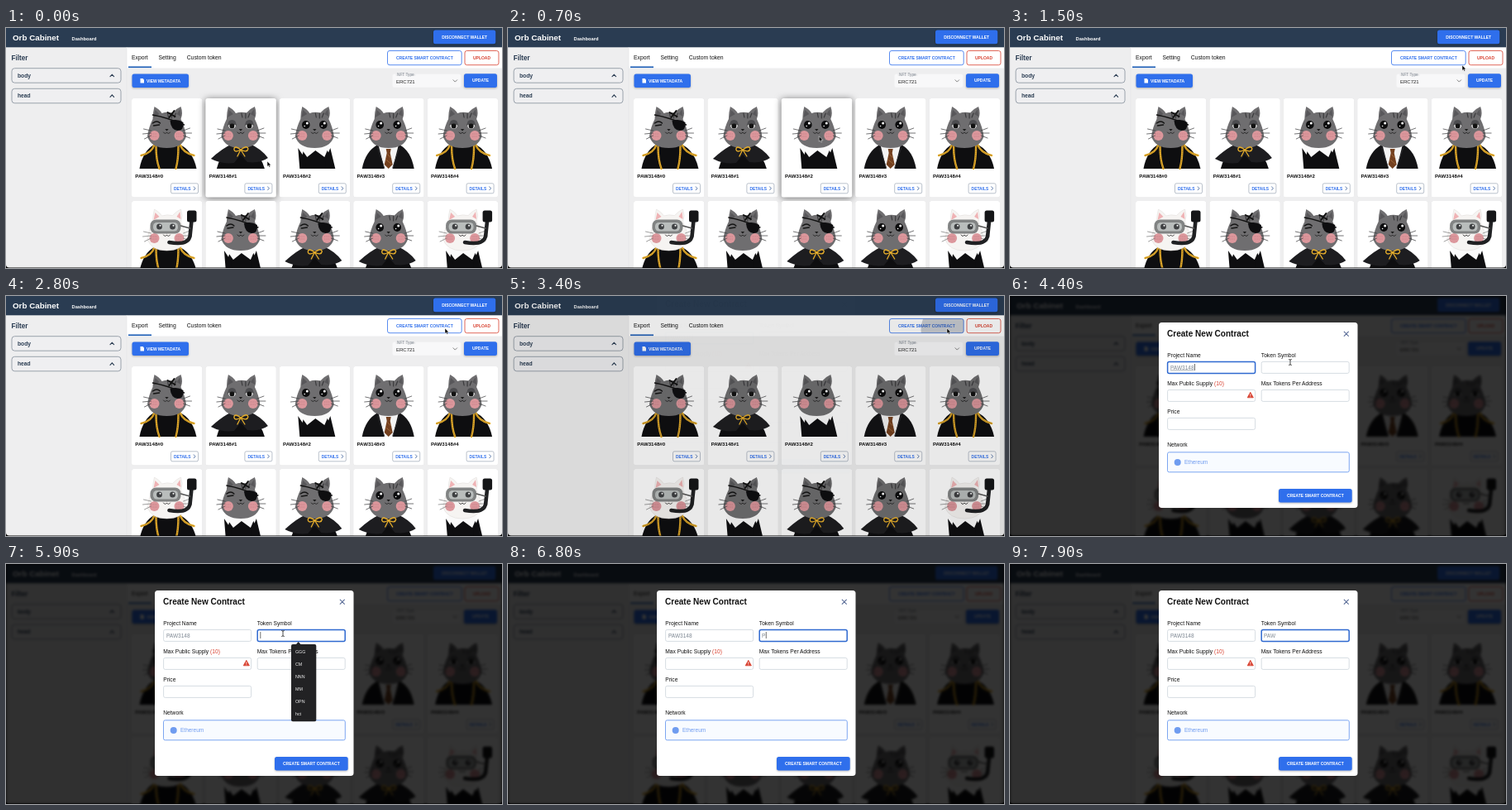
These frames come from a looping animation (600x290 px, 8000 ms). An HTML page:

```html
<!DOCTYPE html>
<html lang="en">
<head>
<meta charset="utf-8">
<title>Create contract</title>
<style>
  html, body { margin: 0; width: 100%; height: 100%; overflow: hidden; background: #000; }
  svg { display: block; width: 600px; height: 290px; font-family: "Liberation Sans", Arial, sans-serif; }
  .card { filter: drop-shadow(0 .5px .5px #0002); }
  .card.hover { filter: drop-shadow(0 1px 4px #0008); }
  .raised { filter: drop-shadow(0 1px 1px #0004); }
</style>
</head>
<body>
<svg id="stage" viewBox="0 0 600 290"></svg>
<script>
const LOOP = 8000;
const BLUE = '#2f6fec', RED = '#d8402f', NAVY = '#2a3c52', GOLD = '#e6ae2c', BLACK = '#0e0e10';
const COLLECTION = 'PAW3148', SYMBOL = 'PAW';

// Markup helpers
const text = (x, y, size, str, fill = '#111', extra = '') =>
  `<text x="${x}" y="${y}" font-size="${size}" fill="${fill}" ${extra}>${str}</text>`;
const bold = (x, y, size, str, fill, extra = '') =>
  text(x, y, size, str, fill, 'font-weight="700" ' + extra);
const rect = (x, y, w, h, fill, extra = '') =>
  `<rect x="${x}" y="${y}" width="${w}" height="${h}" fill="${fill}" ${extra}/>`;
const line = (d, stroke, width = 1, extra = '') =>
  `<path d="${d}" fill="none" stroke="${stroke}" stroke-width="${width}" stroke-linecap="round" ${extra}/>`;
const shape = (d, fill, extra = '') => `<path d="${d}" fill="${fill}" ${extra}/>`;
const ball = (x, y, rx, ry, fill) => `<ellipse cx="${x}" cy="${y}" rx="${rx}" ry="${ry}" fill="${fill}"/>`;
const group = (x, y, body, extra = '') => `<g transform="translate(${x} ${y})" ${extra}>${body}</g>`;

function button(x, y, w, h, label, color, filled = true, textX = x + w / 2) {
  const box = filled
    ? rect(x, y, w, h, color, 'rx="2.5" class="raised"')
    : rect(x, y, w, h, '#fff', `rx="2.5" stroke="${color}" stroke-width=".8"`);
  return box + bold(textX, y + h / 2 + 1.8, 5, label, filled ? '#fff' : color, 'text-anchor="middle"');
}

// Cats: x is measured from the middle of the card, y from its top
const braid = d => line(d, GOLD, 2.4) + line(d, '#8d6418', .6, 'stroke-dasharray="1 1.6"');
const bodies = {
  admiral: shape('M-33 85Q-29 63-14 55H14Q31 62 36 85Z', BLACK) +
    braid('M-15 56Q-18 66-31 69M16 56Q20 66 33 69') +
    braid('M-13 58Q-13 74-9 85M14 58Q14 74 11 85'),
  cape: shape('M-29 85Q-26 70-12 62H12Q25 70 29 85Z', BLACK) +
    shape('M-36 73Q-22 60-10 55H11Q25 61 33 72Q23 79 8 77L0 68-8 78Q-23 80-36 73Z', '#1d1d20'),
  tuxedo: shape('M-16 85Q-17 68-11 58H11Q20 66 23 85Z', BLACK) +
    shape('M-19 57H18L12 71 1 63-9 71Z', '#fafafa') +
    shape('M-20 60L-12 72-10 85H-18ZM19 60L14 72 13 85H25Z', BLACK),
  suit: shape('M-32 85Q-28 64-13 56H13Q27 63 31 85Z', '#131315') +
    shape('M-12 57H12L5 85H-5Z', '#f4f4f4') +
    shape('M-3 61H3L2 66 5 80 0 85-5 80-2 66Z', '#74401f') +
    line('M-1 68L3 72M-3 74L3 79', '#a8713f', .8) +
    line('M-13 60L-5 84M13 60L5 84', '#2d2d30', .8)
};

const openEye = x => ball(x, 32, 4.8, 5, '#0c0c0d') + ball(x + 1.5, 30, 1.5, 1.6, '#fff') + ball(x - 1.6, 33.5, .8, .8, '#fff');
const sleepyEye = x => ball(x, 32, 4.5, 5, '#f4f4f4') + ball(x, 33, 3, 3.6, '#111') +
  shape(`M${x - 5} 32Q${x - 5} 26 ${x} 26Q${x + 5} 26 ${x + 5} 32Q${x} 29.5 ${x - 5} 32Z`, '#4d4d50') +
  line(`M${x - 5} 32Q${x} 29.5 ${x + 5} 32`, '#222', .7);
const faces = {
  open: openEye(-10.5) + openEye(10.5),
  sleepy: sleepyEye(-10.5) + sleepyEye(10.5),
  pirate: line('M-17 30Q-12 26-8 30M-16 33L-9 32', '#141414', 1.4) +
    line('M-17 20Q0 23 21 32', '#111', 1.4) +
    shape('M4 27Q13 24 20 29Q21 39 13 39Q5 38 4 27Z', BLACK) +
    line('M1 17L10 22M9 15L3 23', '#111', 2),
  diver: rect(-20, 22.5, 37, 17, '#818383', 'rx="7"') +
    rect(-16.5, 26, 30, 10.5, '#b9bdbc', 'rx="4.5"') +
    ball(-9, 31, 3.4, 3.6, '#3f4143') + ball(7, 31, 3.4, 3.6, '#3f4143') +
    ball(-8, 29.8, 1, 1, '#fff') + ball(8, 29.8, 1, 1, '#fff') +
    line('M3 50Q25 54 28 43L30 24', '#202123', 4.6) +
    rect(24.5, 11.5, 11.5, 14, '#151618', 'rx="2.5"') + line('M17 30L28 33', '#555', 1.5)
};

function cat(face, body) {
  const white = face === 'diver';
  const fur = white ? '#f6f4f2' : '#6f6e70';
  const cheek = '#dc979c';
  return bodies[body] +
    shape('M-15 10Q-9 13-6 18Q0 16 7 17.5Q12 12 17 10Q20 18 17 25Q22 35 23.5 46Q19 60 0 60Q-19 60-23.5 46Q-22 35-17 25Q-17 17-15 10Z',
      fur, white ? 'stroke="#dedbd8" stroke-width=".5"' : '') +
    shape('M-14 14L-9 19-16 23ZM16 13L12 19 17 22Z', white ? '#efb3b5' : '#58575a') +
    (white ? '' : line('M1 18L2 23M6 18L6 24M11 18L9 23', '#3a3a3c', 1.2)) +
    ball(-15, 45, 6, 6, cheek) + ball(15, 45, 6, 6, cheek) +
    line('M-18 43H-12M-18 46H-12M12 43H18M12 46H18', '#b9757b', .7, 'stroke-dasharray=".1 1.7"') +
    line('M-19 39L-28 37M-19 42L-29 43M-19 45L-27 49M20 39L28 36M20 42L30 42M20 45L28 48', white ? '#777' : '#39393b', .7) +
    shape('M-2.2 37H2.2L0 39.5Z', '#1b1b1b') + line('M-4 41Q-2 44 0 41Q2 44 4 41', '#1b1b1b', .8) +
    faces[face] +
    (body === 'cape' ? line('M0 62Q-8 56-8 62Q-7 66 0 62Q8 56 9 61Q8 66 0 62L-4 70M0 62L5 70', GOLD, 1.3) : '');
}

const cats = [
  ['pirate', 'admiral'], ['sleepy', 'cape'], ['open', 'tuxedo'], ['open', 'suit'], ['sleepy', 'admiral'],
  ['diver', 'admiral'], ['pirate', 'tuxedo'], ['pirate', 'cape'], ['open', 'cape'], ['diver', 'tuxedo']
];
const cardX = i => 152 + (i % 5) * 89.4;
const cardY = i => 85 + Math.floor(i / 5) * 124;

const card = ([face, body], i) => group(cardX(i), cardY(i),
  rect(0, 0, 85.4, 119.5, '#fff', 'rx="2.5"') +
  group(42.5, 0, cat(face, body)) +
  bold(4.3, 95.6, 6.1, `${COLLECTION}#${i}`) +
  rect(47.5, 102.8, 33, 12, '#fff', 'rx="1.8" stroke="#8b97a8" stroke-width=".6"') +
  bold(51, 110.7, 4.9, 'DETAILS', BLUE) +
  line('M75.2 106.8L77 108.8 75.2 110.8', '#355a96', .8), 'class="card"');

const filterRow = (y, label) =>
  rect(7, y, 132, 17.5, '#efeff1', 'rx="3.5" stroke="#76828f" stroke-width=".7"') +
  bold(14, y + 11, 6.7, label, NAVY) +
  line(`M126 ${y + 10}L128.3 ${y + 7.6} 130.6 ${y + 10}`, NAVY, 1.1);

const page =
  rect(0, 0, 600, 290, '#eeeeef') +
  rect(146, 23, 454, 25.5, '#fff') +
  rect(0, 0, 600, 23.3, NAVY) +
  bold(8, 14.6, 9.8, 'Orb Cabinet', '#fff') +
  bold(79.5, 14.8, 5.75, 'Dashboard', '#fff') +
  button(517, 2.5, 75.3, 16.8, 'DISCONNECT WALLET', BLUE) +
  bold(6.5, 39, 8.2, 'Filter', NAVY) +
  filterRow(48.7, 'body') + filterRow(73.3, 'head') +
  line('M146 23.5V290', '#e2e2e4', .6) +
  text(152, 38.3, 6.8, 'Export') + text(184.5, 38.3, 6.8, 'Setting') + text(218.7, 38.3, 6.8, 'Custom token') +
  rect(148, 46.4, 28, 1.7, '#2463b8') +
  button(461.5, 27.5, 89.7, 17.2, 'CREATE SMART CONTRACT', BLUE, false) +
  '<g clip-path="url(#press)"><circle id="ripple" cx="531" cy="40" fill="#39445c"/></g>' +
  button(555, 27.5, 41, 17.2, 'UPLOAD', RED, false) +
  button(152.5, 55.5, 68.5, 16.5, 'VIEW METADATA', BLUE, true, 190.5) +
  shape('M162.5 61H165.5L167 62.5V66.5H162.5Z', '#fff') +
  rect(467.5, 55.8, 82.7, 16, '#f8f8f9', 'rx="2"') +
  rect(471.5, 53, 24, 5, '#eeeeef') +
  text(473, 57.8, 4.75, 'NFT Type', '#7d858f') +
  text(472, 66.5, 6, 'ERC721', '#222') +
  line('M541 62.8L543.3 65.1 545.6 62.8', '#666', .8) +
  button(554, 55.3, 40, 16.7, 'UPDATE', BLUE) +
  cats.map(card).join('');

// Dialog
const field = (x, y, label, id = '') =>
  text(x, y - 5, 6.7, label) +
  rect(x + .4, y + .4, 106, 14, '#fff', `rx="2" stroke="#ccd3db" stroke-width=".8" ${id && `id="${id}"`}`);

const dialog =
  rect(180, 32, 240.5, 224, '#fff', 'rx="3.5"') +
  bold(190, 49, 10.05, 'Create New Contract') +
  line('M404.2 43.2L409.4 48.4M409.4 43.2L404.2 48.4', '#5b6d98', 1.1) +
  field(190.2, 79, 'Project Name', 'nameBox') + field(303.8, 79, 'Token Symbol', 'symbolBox') +
  field(190.2, 113, 'Max Public Supply <tspan fill="#d8402f">(10)</tspan>') + field(303.8, 113, 'Max Tokens Per Address') +
  field(190.2, 147, 'Price') +
  text(194, 88.6, 6.5, COLLECTION, '#7d8792', 'id="name"') +
  text(307, 88.6, 6.5, '', '#7d8792', 'id="symbol"') +
  rect(0, 82, .7, 8, '#333', 'id="caret"') +
  shape('M290.8 116.3L294.4 122.8H287.2Z', RED, `stroke="${RED}" stroke-width=".8" stroke-linejoin="round"`) +
  line('M290.8 118.6V120.4M290.8 121.8V121.9', '#fff', .8) +
  text(190.2, 182, 6.7, 'Network') +
  rect(190.5, 188.8, 219.8, 24, '#f8fbff', 'rx="2" stroke="#6f9cf0" stroke-width=".9"') +
  ball(202.7, 201, 4, 4, '#6f9cf0') +
  text(211, 203.3, 6.5, 'Ethereum', '#6f9cf0') +
  button(325, 233, 88.7, 16.4, 'CREATE SMART CONTRACT', BLUE);

const menu =
  shape('M350 98L353.7 94 357.4 98Z', '#222224') +
  rect(345, 97, 30.3, 93.2, '#222224', 'rx="2"') +
  ['GGG', 'CM', 'NNN', 'MM', 'OPN', 'hct'].map((s, i) => text(350, 108.2 + 15 * i, 5.3, s, '#f4f4f4')).join('');

const arrow = shape('M0 0V6.4L1.5 5.1 2.5 7.3 3.7 6.8 2.7 4.7H4.7Z', '#000', 'stroke="#fff" stroke-width=".5"');
const beam = line('M-1.4-3.5Q0-3.5 0-2.6Q0-3.5 1.4-3.5M0-2.6V2.6M-1.4 3.5Q0 3.5 0 2.6Q0 3.5 1.4 3.5', '#222', .8);

const stage = document.getElementById('stage');
stage.innerHTML =
  `<clipPath id="press">${rect(461.5, 27.5, 89.7, 17.2, '#000', 'rx="2.5"')}</clipPath>` +
  `<g id="page">${page}</g>` +
  rect(0, 0, 600, 290, '#000', 'id="shade"') +
  shape('M0 286Q0 289.4 4 289.4H596Q600 289.4 600 286V290H0Z', '#000') +
  `<g id="dialog">${dialog}</g><g id="menu">${menu}</g>` +
  `<g id="cursor"><g id="arrow">${arrow}</g><g id="beam">${beam}</g></g>`;

const ui = Object.fromEntries([...stage.querySelectorAll('[id]')].map(el => [el.id, el]));
const cardEls = [...stage.querySelectorAll('.card')];

// Timing
const CLICK = 3290, FOCUS = 4900, MENU = 5400;
const KEYS = [6500, 6900, 7300];
const path = [
  [0, 316, 161], [400, 316, 161], [1300, 547, 45], [1900, 547, 45],
  [2600, 531, 39], [3700, 531, 39], [4300, 339, 80], [4500, 339, 80], [4800, 335, 84]
];

const clamp = v => Math.min(1, Math.max(0, v));
const smooth = v => v * v * (3 - 2 * v);
const progress = (t, start, length) => clamp((t - start) / length);
const show = (el, on) => el.setAttribute('visibility', on ? 'visible' : 'hidden');

function pointer(t) {
  const next = path.findIndex(p => p[0] > t);
  if (next < 0) return path.at(-1).slice(1);
  const [t0, x0, y0] = path[next - 1], [t1, x1, y1] = path[next];
  const k = smooth((t - t0) / (t1 - t0));
  return [x0 + (x1 - x0) * k, y0 + (y1 - y0) * k];
}

function setFocus(box, on) {
  box.setAttribute('stroke', on ? '#2f69d0' : '#ccd3db');
  box.setAttribute('stroke-width', on ? 1.5 : .8);
}

function render(t) {
  const [x, y] = pointer(t);
  const dim = smooth(progress(t, 3320, 400));
  const slide = 1 - (1 - progress(t, 3400, 280)) ** 2;
  const typed = KEYS.filter(k => t >= k).length;
  const onSymbol = t >= FOCUS;

  cardEls.forEach((el, i) => {
    const over = dim === 0 && x >= cardX(i) && x <= cardX(i) + 85.4 && y >= cardY(i) && y <= cardY(i) + 119.5;
    el.classList.toggle('hover', over);
  });
  ui.ripple.setAttribute('r', 85 * progress(t, CLICK, 300));
  ui.ripple.setAttribute('opacity', .28 * (1 - progress(t, 3420, 180)));
  ui.page.style.filter = dim > .2 ? `blur(${(1.7 * dim).toFixed(2)}px)` : 'none';
  ui.shade.setAttribute('opacity', .8 * dim);

  ui.dialog.setAttribute('opacity', progress(t, 3400, 230));
  ui.dialog.setAttribute('transform', `translate(0 ${-36 * (1 - slide)})`);
  setFocus(ui.nameBox, !onSymbol);
  setFocus(ui.symbolBox, onSymbol);
  ui.name.setAttribute('text-decoration', onSymbol ? 'none' : 'underline');
  ui.symbol.textContent = SYMBOL.slice(0, typed);

  const lastInput = typed ? KEYS[typed - 1] : onSymbol ? FOCUS : CLICK;
  const field = onSymbol ? ui.symbol : ui.name;
  const start = onSymbol ? 307 : 194;
  ui.caret.setAttribute('x', start + .5 + field.getComputedTextLength());
  ui.caret.setAttribute('opacity', (t - lastInput) % 1000 < 500 ? 1 : 0);
  show(ui.menu, t >= MENU && !typed);

  const overField = slide === 1 && x > 304 && x < 410 && y > 78 && y < 94;
  ui.cursor.setAttribute('transform', `translate(${x} ${y})`);
  show(ui.arrow, !typed && !overField);
  show(ui.beam, !typed && overField);
}

const began = performance.now();
function tick() {
  render((performance.now() - began) % LOOP);
  requestAnimationFrame(tick);
}
tick();
</script>
</body>
</html>
```
